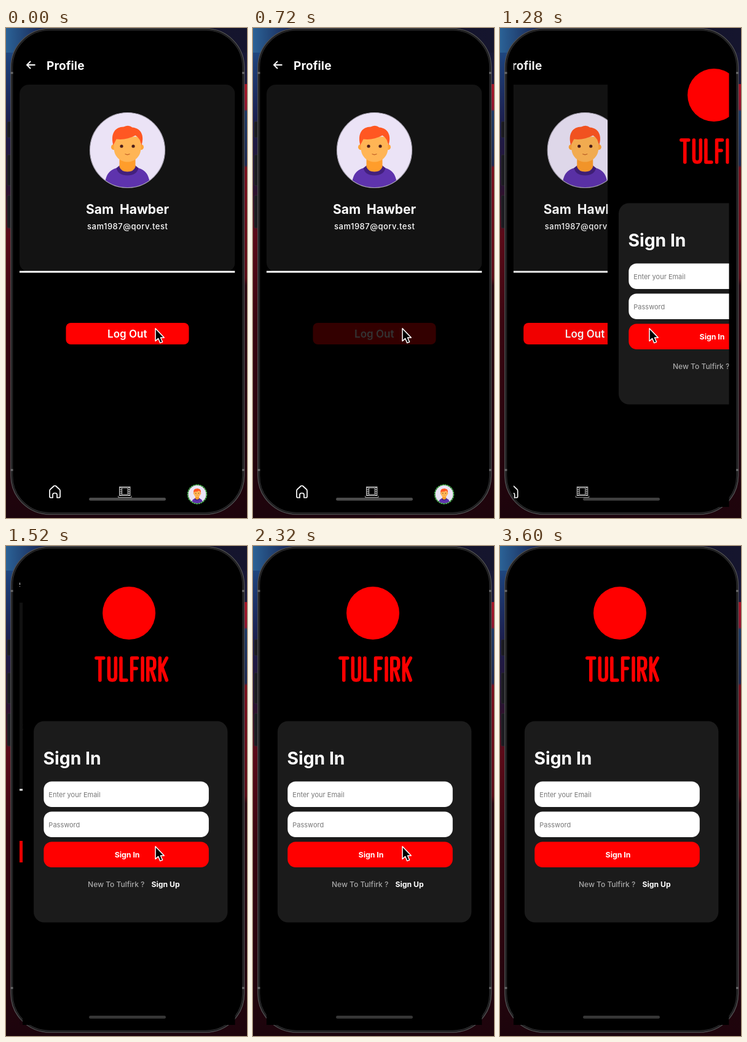
An HTML page that plays this animation: 392 px wide and 796 px high, repeating every 3680 ms.

```html
<!DOCTYPE html>
<html lang="en">
<head>
<meta charset="utf-8">
<title>Log out</title>
<style>
  html, body { margin: 0; width: 100%; height: 100%; overflow: hidden; background: #000; }
  svg { display: block; width: 392px; height: 796px; }
  text { font-family: Inter, sans-serif; fill: #fff; white-space: pre; }
  .mid { text-anchor: middle; }
  .bold { font-weight: 700; }
  .semi { font-weight: 600; }
  .hint { font-size: 11px; fill: #777; }
</style>
</head>
<body>
<svg viewBox="0 0 392 796" xmlns="http://www.w3.org/2000/svg">
  <defs>
    <linearGradient id="left" x1="0" y1="0" x2="0" y2="1">
      <stop offset="0" stop-color="#245a90"/>
      <stop offset=".07" stop-color="#1d3f78"/>
      <stop offset=".2" stop-color="#1c1c4a"/>
      <stop offset=".33" stop-color="#2a1230"/>
      <stop offset=".42" stop-color="#5c0a18"/>
      <stop offset=".6" stop-color="#3a0610"/>
      <stop offset="1" stop-color="#1c040c"/>
    </linearGradient>
    <linearGradient id="right" x1="0" y1="0" x2="0" y2="1">
      <stop offset="0" stop-color="#15152e"/>
      <stop offset=".114" stop-color="#1a1a3c"/>
      <stop offset=".115" stop-color="#a81426"/>
      <stop offset=".166" stop-color="#8e1530"/>
      <stop offset=".17" stop-color="#1d3a66"/>
      <stop offset=".28" stop-color="#1d2850"/>
      <stop offset=".285" stop-color="#7a0d1c"/>
      <stop offset=".51" stop-color="#5a0a16"/>
      <stop offset=".525" stop-color="#2a0610"/>
      <stop offset="1" stop-color="#1e040c"/>
    </linearGradient>
    <linearGradient id="top">
      <stop offset="0" stop-color="#2b6296"/>
      <stop offset=".14" stop-color="#1a2c5c"/>
      <stop offset=".4" stop-color="#141428"/>
      <stop offset="1" stop-color="#15152e"/>
    </linearGradient>
    <clipPath id="screen"><rect x="22" y="36" width="350.5" height="742"/></clipPath>
    <clipPath id="disc"><circle r="61"/></clipPath>
    <g id="avatar">
      <circle r="61" fill="#ebe3f6"/>
      <g clip-path="url(#disc)">
        <path d="M-37 64C-37 42-31 33-18 29Q0 22 18 29C31 33 37 42 37 64Z" fill="#5e33ad"/>
        <path d="M-18 29Q-15 41 0 41T18 29L13 25H-13Z" fill="#43207d"/>
        <path d="M-13 8H13V27Q10 35 0 35T-13 27Z" fill="#ff9d2b"/>
        <circle cx="-22" cy="-5" r="4.5" fill="#ffa437"/>
        <circle cx="22" cy="-5" r="4.5" fill="#ffa437"/>
        <path d="M-22-22H22V-4C22 11 11 19 0 19S-22 11-22-4Z" fill="#ffb555"/>
        <path d="M-23-8C-28-27-20-38-6-38Q2-42 8-37C22-36 28-24 23-8L20-17Q17-22 13-24Q-2-16-18-18Z" fill="#ff5722"/>
        <circle cx="-9.5" cy="-6.5" r="2.6" fill="#4b1d1a"/>
        <circle cx="9.5" cy="-6.5" r="2.6" fill="#4b1d1a"/>
        <path d="M-4 6Q0 8.500 4 6" fill="none" stroke="#c96a2a" stroke-width="1.300"/>
      </g>
    </g>
  </defs>

  <!-- backdrop and phone body -->
  <rect width="200" height="796" fill="url(#left)"/>
  <rect x="200" width="192" height="796" fill="url(#right)"/>
  <rect width="392" height="40" fill="url(#top)"/>
  <g fill="#1b1b20" stroke="#303036" stroke-width=".6">
    <rect x="2" y="152" width="8" height="26" rx="2"/>
    <rect x="2" y="206" width="8" height="50" rx="2"/>
    <rect x="2" y="272" width="8" height="53" rx="2"/>
  </g>
  <rect x="8" y="1" width="379.500" height="789" rx="63" fill="#0a0a0a" stroke="#4c4c4e" stroke-width="1.600"/>
  <rect x="10.500" y="3.500" width="374.500" height="784" rx="60" fill="#000" stroke="#29292b" stroke-width="1.600"/>
  <path d="M7.500 73H11.500M384 73H388M7.500 718H11.500M384 718H388" stroke="#6a6a6c" stroke-width="3"/>

  <g clip-path="url(#screen)">
    <g id="profile">
      <path d="M47.500 60H34.500M40 54L34 60L40 66" fill="none" stroke="#fff" stroke-width="1.900"/>
      <text x="66" y="67.500" font-size="19" class="bold" letter-spacing=".15">Profile</text>
      <rect x="22" y="92" width="350.500" height="304" rx="15" fill="#131313"/>
      <rect x="22" y="394.600" width="350.500" height="2.900" fill="#fff"/>
      <use href="#avatar" x="197.500" y="198.500"/>
      <circle cx="197.500" cy="198.500" r="61" fill="none" stroke="#a9a4b2" stroke-width="1.200"/>
      <text x="197.500" y="302" font-size="21" class="bold mid">Sam  Hawber</text>
      <text x="197.700" y="327" font-size="13" font-weight="500" class="mid" letter-spacing=".5">sam1987@qorv.test</text>
      <g id="logout">
        <rect x="97.500" y="479" width="200" height="35" rx="8" fill="#f00"/>
        <text x="197.300" y="502.500" font-size="17" class="semi mid">Log Out</text>
      </g>
      <path d="M71 752Q71 750 72.500 749L78 744Q79.500 743 81 744L86.500 749Q88 750 88 752V761Q88 763 86 763H83V758Q83 755.500 79.500 755.500T76 758V763H73Q71 763 71 761Z" fill="none" stroke="#fff" stroke-width="1.700" stroke-linejoin="round"/>
      <g fill="none" stroke="#d0d0d0">
        <rect x="184.500" y="745.500" width="17.500" height="14" stroke-width="1"/>
        <path d="M186.500 746V759M200 746V759" stroke-width="2" stroke-dasharray="1.600 1.400"/>
        <rect x="188.500" y="747" width="9.500" height="11" stroke-width="1"/>
        <path d="M182.500 760V762.500H204V760" stroke-width="1" stroke="#999"/>
      </g>
      <use href="#avatar" transform="translate(311 757.500) scale(.24)"/>
      <circle cx="311" cy="757.500" r="15.300" fill="none" stroke="#55c45c" stroke-width="1.700" stroke-dasharray="3 .8"/>
    </g>
    <rect id="shade" x="22" width="350.500" height="796"/>

    <g id="signin">
      <rect x="22" width="350.500" height="796"/>
      <circle cx="195" cy="109" r="43" fill="#f00"/>
      <path d="M141.750 182H153.750M147.750 182V218
        M162.300 182V212Q162.300 218 167.800 218T173.300 212V182
        M181.900 182V218H190.900
        M208.500 182H199.500V218M199.500 199H207
        M217 182V218
        M225.700 218V182H231Q236.700 182 236.700 188V194Q236.700 200 231 200H225.700M231 200L236.700 218
        M245.300 182V218M256.300 182L246.500 201M249 198L256.300 218"
        fill="none" stroke="#f00" stroke-width="5.500" stroke-linecap="round" stroke-linejoin="round"
        role="img" aria-label="TULFIRK"/>
      <rect x="40" y="284.500" width="315.300" height="327" rx="17" fill="#1b1b1b"/>
      <text x="55.500" y="355" font-size="28.300" class="bold">Sign In</text>
      <rect x="56.300" y="382.500" width="268.500" height="41.500" rx="13" fill="#fff"/>
      <text x="64.300" y="407.500" class="hint">Enter your Email</text>
      <rect x="56.300" y="431.500" width="268.500" height="41.500" rx="13" fill="#fff"/>
      <text x="64.300" y="456.500" class="hint">Password</text>
      <rect x="56.300" y="480.500" width="268.500" height="41.500" rx="13" fill="#f00"/>
      <text x="192" y="505.500" font-size="12.300" class="bold mid">Sign In</text>
      <text x="128" y="554" font-size="12" font-weight="500" style="fill:#a9a9a9">New To Tulfirk ?</text>
      <text x="231.500" y="554" font-size="12.200" class="bold">Sign Up</text>
    </g>
  </g>

  <rect id="bar" x="135" y="763" width="125" height="4.800" rx="2.400"/>
  <path id="cursor" d="M243 488V508.600L247.600 504.400L250.800 511.600L254.600 510L251.500 503H257.300Z" fill="#000" stroke="#fff" stroke-width="1.500" stroke-linejoin="round"/>
</svg>
<script>
  const LOOP = 3680, STEP = 80, WIDTH = 350.5, PARALLAX = 0.3;
  const PUSH_AT = 1175, SPRING = 0.018;
  const el = id => document.getElementById(id);
  const [profile, signin, shade, logout, bar, cursor] =
    ['profile', 'signin', 'shade', 'logout', 'bar', 'cursor'].map(el);

  const ramp = (t, from, length) => Math.min(1, Math.max(0, (t - from) / length));
  const ease = k => k * k * (3 - 2 * k);

  // Critically damped spring from 0 to 1
  function push(t) {
    const u = Math.max(0, t - PUSH_AT) * SPRING;
    return 1 - (1 + u) * Math.exp(-u);
  }

  function draw(t) {
    const p = push(t);
    const press = ease(ramp(t, 520, 150)) - ease(ramp(t, 800, 250));
    const grey = Math.round(76 - 22 * p);
    profile.setAttribute('transform', `translate(${-PARALLAX * WIDTH * p} 0)`);
    signin.setAttribute('transform', `translate(${WIDTH * (1 - p)} 0)`);
    shade.setAttribute('opacity', 0.1 * p);
    logout.setAttribute('opacity', 1 - 0.8 * press);
    bar.setAttribute('fill', `rgb(${grey},${grey},${grey})`);
    cursor.setAttribute('visibility', t < 2700 ? 'visible' : 'hidden');
  }

  function tick() {
    const t = performance.now() % LOOP;
    draw(Math.floor(t / STEP) * STEP);
    requestAnimationFrame(tick);
  }
  tick();
</script>
</body>
</html>
```
